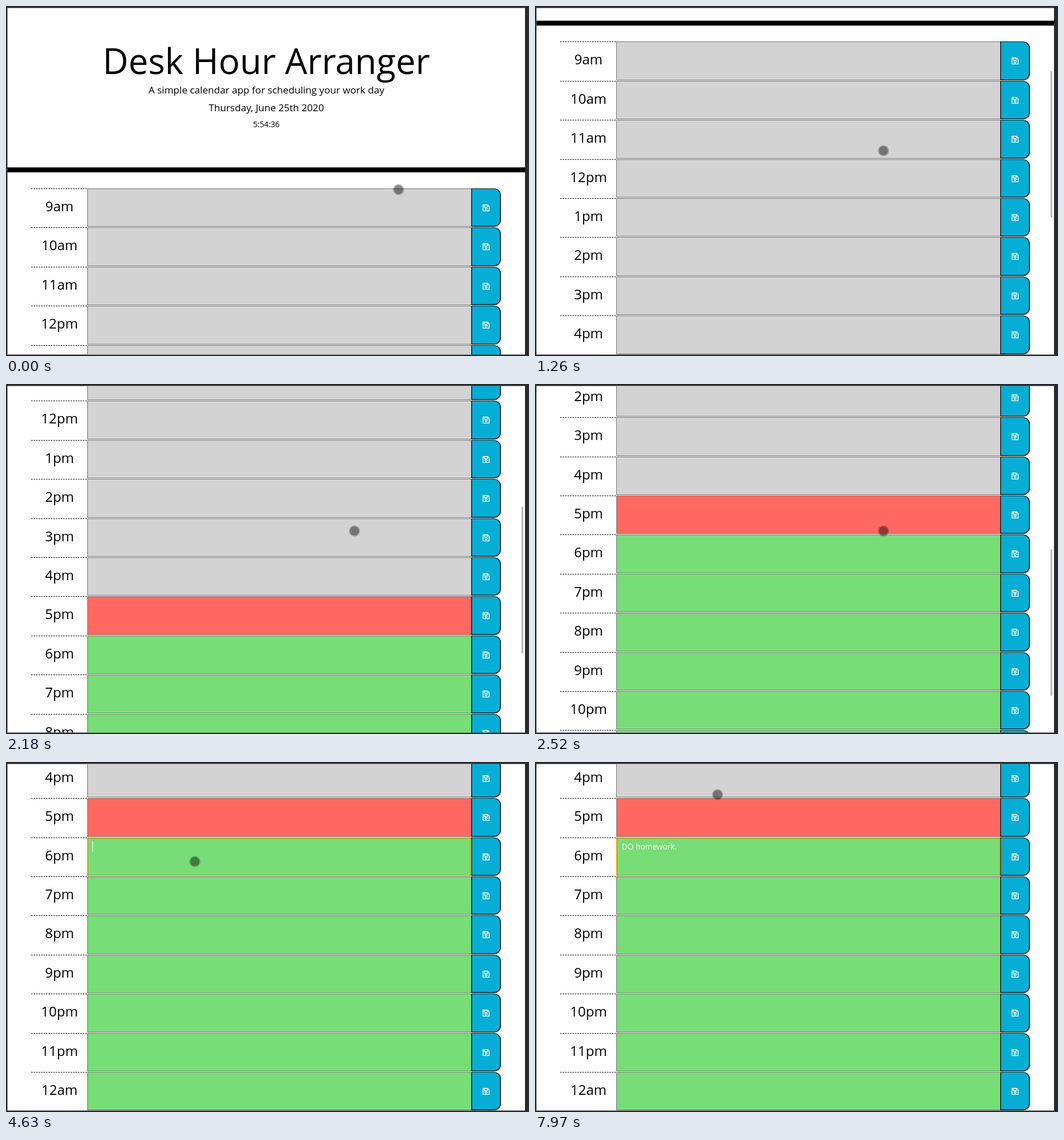
An HTML page with a canvas for the animation above (8 s loop, 914 px wide and 612 px high).

```html
<!DOCTYPE html>
<html lang="en">
<head>
<meta charset="utf-8">
<title>Day planner</title>
<style>
  html, body { margin: 0; width: 100%; height: 100%; overflow: hidden; background: #2a2a2e; }
  canvas { display: block; }
</style>
</head>
<body>
<canvas id="stage" width="914" height="612"></canvas>
<script>
const ctx = document.getElementById('stage').getContext('2d');
const LOOP = 8000;
const VIEW = { x: 2.5, y: 3.5, w: 904.5, h: 606 };
const ROW = { top: 319.4, pitch: 68.4, left: 142, right: 813 };
const NOTCH = 85.5;
const HOURS = Array.from({ length: 16 }, (_, i) => {
  const h = i + 9;
  return ((h - 1) % 12 + 1) + (h < 12 || h === 24 ? 'am' : 'pm');
});
const NOW_ROW = 8, EDIT_ROW = 9;
const FOCUS_AT = 3630;

const progress = (t, from, to) => Math.min(1, Math.max(0, (t - from) / (to - from)));

// Eased share of a distance covered between two times
function glide(t, from, to, distance) {
  const u = progress(t, from, to);
  return distance * u * u * (3 - 2 * u);
}

// Three turns of the wheel; the last one reaches the end of the page
function scrollAt(t) {
  return glide(t, 670, 1260, 3 * NOTCH)
       + glide(t, 1360, 1600, NOTCH)
       + glide(t, 1680, 2980, 461);
}

function pointerAt(t) {
  const p = { x: 686, y: 321 };
  const move = (from, to, dx, dy) => {
    p.x += glide(t, from, to, dx);
    p.y += glide(t, from, to, dy);
  };
  move(30, 210, -77, -68);
  move(1450, 2180, 0, 4);
  move(2700, 3020, -156.5, -27);
  move(3120, 3600, -122.5, -56);
  move(7870, 7970, -11, -117);
  return p;
}

// Typing comes in bursts with a steady gap between keys
function noteAt(t) {
  const note = { text: '', since: t - FOCUS_AT };
  const type = (start, gap, word) => {
    [...word].forEach((ch, i) => {
      const age = t - start - i * gap;
      if (age < 0) return;
      note.text += ch;
      note.since = age;
    });
  };
  type(4770, 160, 'DO ');
  type(5930, 110, 'home');
  type(6440, 100, 'work');
  type(7200, 0, '.');
  return note;
}

function rect(x, y, w, h, color) {
  ctx.fillStyle = color;
  ctx.fillRect(x, y, w, h);
}

function rounded(x, y, w, h, radii, color) {
  ctx.fillStyle = color;
  ctx.beginPath();
  ctx.roundRect(x, y, w, h, radii);
  ctx.fill();
}

function disc(x, y, r, color) {
  ctx.fillStyle = color;
  ctx.beginPath();
  ctx.arc(x, y, r, 0, Math.PI * 2);
  ctx.fill();
}

function text(str, x, y, size, color = '#000', align = 'center') {
  ctx.font = `${size}px "Open Sans", sans-serif`;
  ctx.textAlign = align;
  ctx.fillStyle = color;
  ctx.fillText(str, x, y);
}

function header(s, t) {
  const second = 36 + Math.floor((t + 880) / 1000);
  text('Desk Hour Arranger', 455, 119 - s, 61.56);
  text('A simple calendar app for scheduling your work day', 455, 153 - s, 17.1);
  text('Thursday, June 25th 2020', 455, 184 - s, 17.1);
  text('5:54:' + second, 455, 212 - s, 13.68);
  rect(0, 282.2 - s, 914, 8.6, '#000');
}

function saveIcon(x, y) {
  const r = 5.3, cut = 2.6;
  ctx.strokeStyle = '#fff';
  ctx.lineWidth = 1.3;
  ctx.beginPath();
  ctx.moveTo(x - r, y - r);
  ctx.lineTo(x + r - cut, y - r);
  ctx.lineTo(x + r, y - r + cut);
  ctx.lineTo(x + r, y + r);
  ctx.lineTo(x - r, y + r);
  ctx.closePath();
  ctx.rect(x - 3, y - 5, 5.2, 3.6);
  ctx.moveTo(x + 1.8, y + 1.6);
  ctx.arc(x, y + 1.6, 1.8, 0, Math.PI * 2);
  ctx.stroke();
}

function button(y, h) {
  const x = ROW.right;
  rounded(x, y, 52, h, [0, 12, 12, 0], '#111');
  rounded(x + 1.4, y + 1, 49, h - 2.6, [0, 11, 11, 0], '#06aed5');
  saveIcon(x + 26, y + 34);
}

// Rows snap to whole pixels
const rowTop = (i, s) => Math.floor(ROW.top + i * ROW.pitch - s);

function row(i, s) {
  const y = rowTop(i, s);
  const h = rowTop(i + 1, s) - y - 1;
  const w = ROW.right - ROW.left;
  ctx.strokeStyle = '#000';
  ctx.lineWidth = 1;
  ctx.setLineDash([2.6, 1.7]);
  ctx.beginPath();
  ctx.moveTo(44, y + 0.5);
  ctx.lineTo(ROW.left, y + 0.5);
  ctx.stroke();
  ctx.setLineDash([]);
  text(HOURS[i], 93.5, y + 40, 23.94);

  const fill = i < NOW_ROW ? '#d3d3d3' : i === NOW_ROW ? '#ff6961' : '#77dd77';
  rect(ROW.left, y, w, h, '#767676');
  rect(ROW.left + 1, y + 1, w - 1, h - 2, fill);
  button(y, h);
}

function editor(s, t) {
  if (t < FOCUS_AT) return;
  const y = rowTop(EDIT_ROW, s);
  ctx.strokeStyle = '#e59700';
  ctx.lineWidth = 1.7;
  ctx.beginPath();
  ctx.roundRect(ROW.left + 0.9, y + 1, ROW.right - ROW.left - 1.4, 65.5, 2);
  ctx.stroke();

  const note = noteAt(t), x = 151.6;
  text(note.text, x, y + 21, 13.68, '#fff', 'left');
  // The caret restarts its blink with every key
  if (note.since % 1000 < 500) {
    rect(Math.floor(x + ctx.measureText(note.text).width), y + 6, 1, 19, '#fff');
  }
}

function scrollbar(s, t) {
  ctx.globalAlpha = progress(t, 670, 760) - progress(t, 3050, 3100);
  rect(901, 5.6 + s * 0.4227, 3, 256, '#b5b5b9');
  ctx.globalAlpha = 1;
}

function pointer(t) {
  const { x, y } = pointerAt(t);
  disc(x, y, 9.8, 'rgba(0,0,0,.22)');
  disc(x, y, 7.9, 'rgba(0,0,0,.3)');
}

function draw(t) {
  const s = scrollAt(t);
  rect(0, 0, 914, 612, '#2a2a2e');
  ctx.save();
  ctx.beginPath();
  ctx.rect(VIEW.x, VIEW.y, VIEW.w, VIEW.h);
  ctx.clip();
  rect(0, 0, 914, 612, '#fff');
  header(s, t);
  HOURS.forEach((_, i) => row(i, s));
  editor(s, t);
  scrollbar(s, t);
  pointer(t);
  ctx.restore();
}

const start = performance.now();
function tick() {
  draw((performance.now() - start) % LOOP);
  requestAnimationFrame(tick);
}
tick();
</script>
</body>
</html>
```
